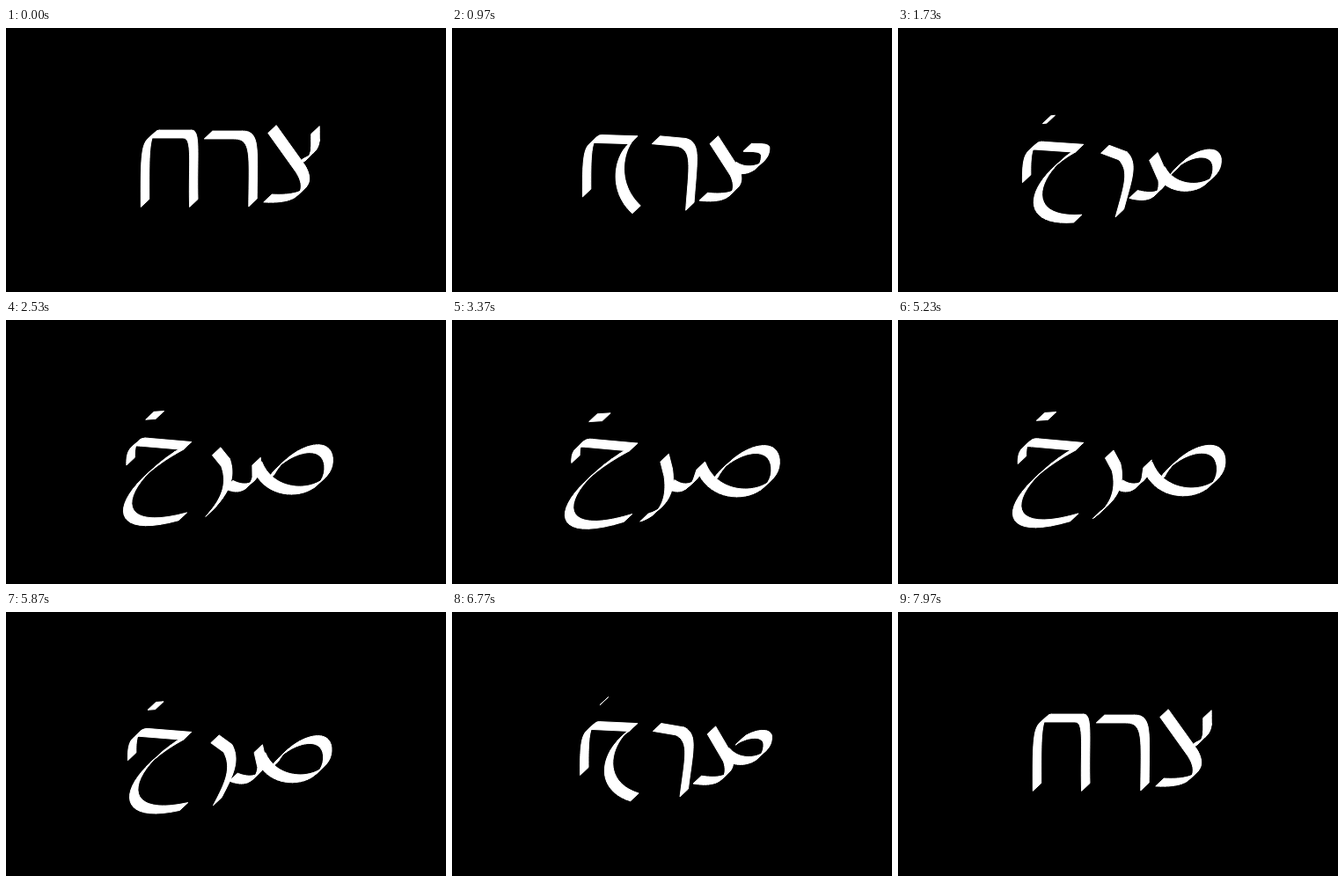
An HTML page with a canvas for the animation above (8000 ms loop, 500 px wide and 300 px high).

```html
<!DOCTYPE html>
<html lang="en">
<head>
<meta charset="utf-8">
<title>Letter morph</title>
<style>
  html, body { margin: 0; width: 100%; height: 100%; overflow: hidden; background: #000; }
  canvas { display: block; }
</style>
</head>
<body>
<canvas id="stage" width="500" height="300"></canvas>
<script>
const LOOP = 8000, REST = 20, STEPS = 24;
const NIB = { x: 4.7, y: 4.4 };          // half of the slanted pen edge

// Each pen path is a start point followed by lines (2 numbers) and cubics (6).
// "pull" sets how early the stroke moves from its Hebrew to its Arabic form.
const strokes = [
  { // het to kha
    pull: 2.3,
    hebrew: [[158, 199], [158, 150, 157, 121, 170, 120.5], [206, 120.5],
             [217, 120, 212, 150, 213.3, 199]],
    arabic: [[140.5, 158], [140, 148, 143, 138, 156, 140], [206, 144.5],
             [120, 190, 100, 256, 200, 225]]
  },
  { // resh to ra
    pull: 1.2,
    hebrew: [[230, 121.5], [264, 121.5], [284, 121.5, 281, 140, 280.5, 198.5]],
    arabic: [[242, 158], [245, 175], [249, 205, 236, 222, 216, 225.5]]
  },
  { // tsadi back to sad link
    pull: 1.9,
    hebrew: [[302.5, 115], [334, 159], [346, 177, 343, 196, 297.5, 193.5]],
    arabic: [[282.5, 166], [279, 176], [274, 188, 262, 196, 248, 186]]
  },
  { // tsadi arm to sad loop
    pull: 2.4,
    hebrew: [[351.5, 116], [351.5, 130, 351.5, 136, 351.5, 131],
             [351, 143, 344, 148, 333, 153]],
    arabic: [[297, 184], [313, 152, 364, 131, 367.5, 163],
             [371, 202, 300, 212, 283, 166]]
  },
  { // dot, hidden until its right end passes its left end
    pull: 1.4,
    hebrew: [[178, 97], [172, 97]],
    arabic: [[160, 111.5], [175.5, 110.5]]
  }
];

const ctx = document.getElementById("stage").getContext("2d");
const mix = (a, b, t) => a + (b - a) * t;

function bezier(points, t) {
  while (points.length > 1) {
    points = points.slice(1).map((p, i) => p.map((v, c) => mix(points[i][c], v, t)));
  }
  return points[0];
}

function trace(pieces) {
  const out = [pieces[0]];
  for (const piece of pieces.slice(1)) {
    const ctrl = [out[out.length - 1]];
    for (let i = 0; i < piece.length; i += 2) ctrl.push(piece.slice(i, i + 2));
    const steps = ctrl.length > 2 ? STEPS : 1;
    for (let s = 1; s <= steps; s++) out.push(bezier(ctrl, s / steps));
  }
  return out;
}

// Sweep the pen edge along the points, keeping every quad wound the same way.
function sweep(points) {
  for (let i = 1; i < points.length; i++) {
    let a = points[i - 1], b = points[i];
    const turn = (b[0] - a[0]) * NIB.y + (b[1] - a[1]) * NIB.x;
    if (turn < 0) [a, b] = [b, a];
    ctx.moveTo(a[0] - NIB.x, a[1] + NIB.y);
    ctx.lineTo(b[0] - NIB.x, b[1] + NIB.y);
    ctx.lineTo(b[0] + NIB.x, b[1] - NIB.y);
    ctx.lineTo(a[0] + NIB.x, a[1] - NIB.y);
    ctx.closePath();
  }
}

function draw(ms) {
  const u = (1 - Math.cos(2 * Math.PI * (ms - REST) / LOOP)) / 2;
  ctx.fillStyle = "#000";
  ctx.fillRect(0, 0, 500, 300);
  ctx.fillStyle = ctx.strokeStyle = "#fff";
  ctx.lineWidth = 1;
  ctx.lineJoin = "round";
  ctx.beginPath();
  for (const { pull, hebrew, arabic } of strokes) {
    const w = 1 - (1 - u) ** pull;
    const points = trace(hebrew.map((p, i) => p.map((v, j) => mix(v, arabic[i][j], w))));
    const hidden = points.length === 2 && points[1][0] <= points[0][0];
    if (!hidden) sweep(points);
  }
  ctx.fill();
  ctx.stroke();
}

const start = performance.now();
function tick() {
  draw((performance.now() - start) % LOOP);
  requestAnimationFrame(tick);
}
tick();
</script>
</body>
</html>
```
